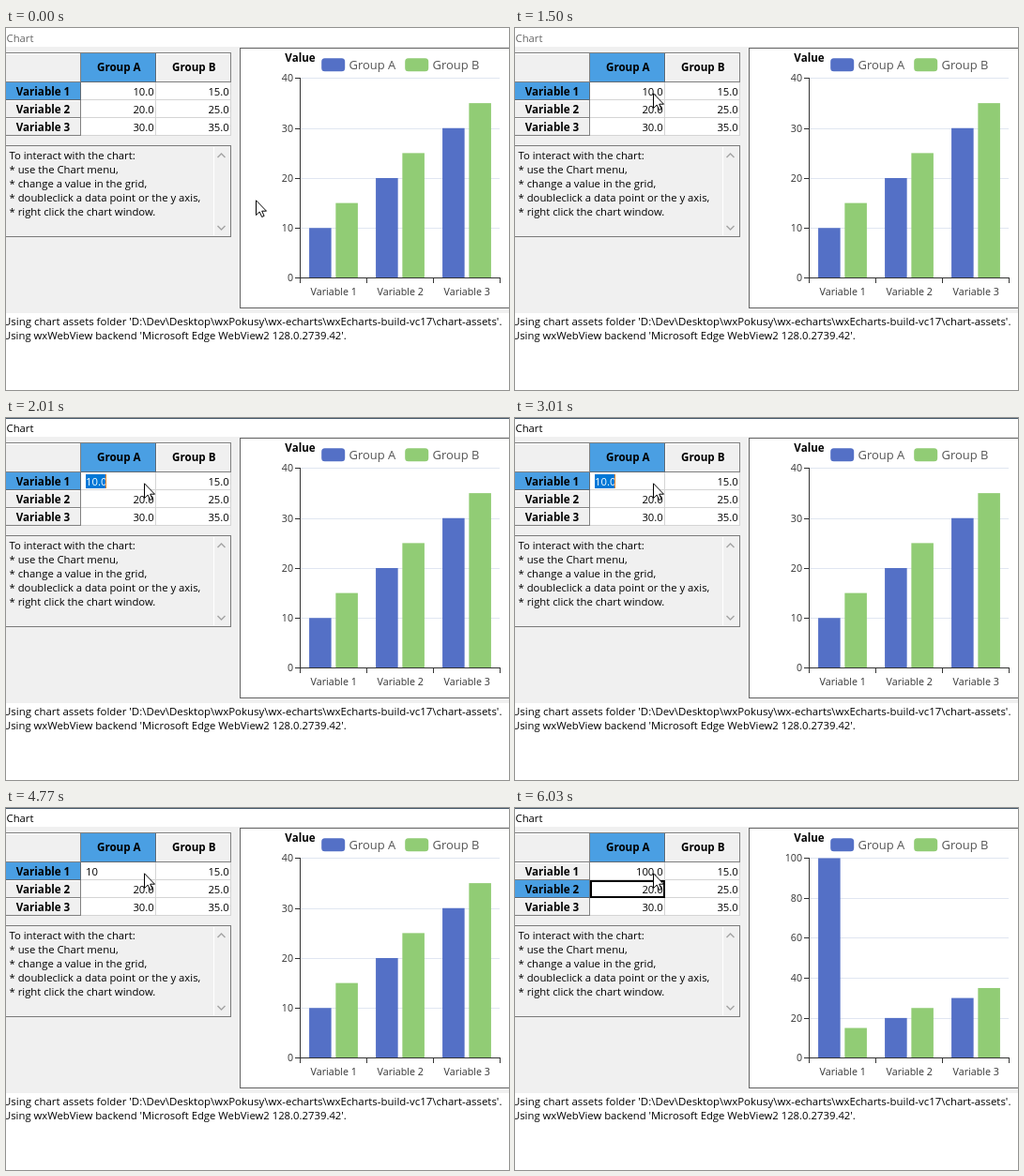
Animation of 536x386 px, one loop 8 s. Source, as an HTML page:

```html
<!DOCTYPE html>
<html lang="en">
<head>
<meta charset="utf-8">
<title>Chart</title>
<style>
html, body { margin: 0; width: 100%; height: 100%; overflow: hidden; background: #f0f0f0; }
svg { display: block; width: 536px; height: 386px; font: 11.3px "Open Sans", "Noto Sans", sans-serif; }
rect, line { shape-rendering: crispEdges; }
.smooth { shape-rendering: auto; }
text { white-space: pre; }
.bold { font-weight: 700; font-size: 11.6px; }
.mid { text-anchor: middle; }
.end { text-anchor: end; }
.axis { font-size: 10.7px; fill: #333; }
.legend { font-size: 12.95px; fill: #555; }

.step { animation: 8s step-end infinite; }
.cursor { animation-name: cursor; }
.title { animation-name: title; }
.focus { animation-name: focus; }
.caret { animation-name: caret; }
.active { animation-name: active; }
.idle { animation-name: idle; }
.editing { animation-name: editing; }
.selected { animation-name: selected; }
.full { animation-name: full; }
.dot { animation-name: dot; }
.ten { animation-name: ten; }
.hundred { animation-name: hundred; }
.before { animation-name: before; }
.after { animation-name: after; }

@keyframes cursor {
  0% { transform: translate(266px, 183px); opacity: 1; }
  9.375% { transform: translate(266px, 182px); opacity: 1; }
  12.5% { transform: translate(223px, 145px); opacity: 1; }
  15.625% { transform: translate(164px, 92px); opacity: 1; }
  18.75% { transform: translate(147px, 69px); opacity: 1; }
  62.75% { transform: translate(147px, 69px); opacity: 0; }
  75.375%, 100% { transform: translate(147px, 69px); opacity: 1; }
}
@keyframes title { 0% { fill: #666; } 21.875%, 100% { fill: #000; } }
@keyframes active { 0% { opacity: 0; } 21.875%, 100% { opacity: 1; } }
@keyframes focus {
  0% { opacity: 0; transform: none; }
  21.875% { opacity: 1; transform: none; }
  25.125% { opacity: 0; transform: none; }
  75.375%, 100% { opacity: 1; transform: translateY(19px); }
}
@keyframes caret {
  0% { opacity: 0; transform: translateX(106px); fill: #ff8728; }
  25.125% { opacity: 1; transform: translateX(106px); fill: #ff8728; }
  31.375% { opacity: 0; transform: translateX(106px); fill: #ff8728; }
  37.625% { opacity: 1; transform: translateX(106px); fill: #ff8728; }
  44% { opacity: 1; transform: translateX(106px); fill: #000; }
  50.25% { opacity: 1; transform: translateX(100px); fill: #000; }
  53.375% { opacity: 1; transform: translateX(97px); fill: #000; }
  59.625% { opacity: 0; transform: translateX(97px); fill: #000; }
  62.75% { opacity: 1; transform: translateX(103px); fill: #000; }
  69%, 100% { opacity: 0; transform: translateX(103px); fill: #000; }
}
@keyframes idle { 0% { opacity: 1; } 25.125%, 100% { opacity: 0; } }
@keyframes editing { 0% { opacity: 0; } 25.125% { opacity: 1; } 75.375%, 100% { opacity: 0; } }
@keyframes selected { 0% { opacity: 0; } 25.125% { opacity: 1; } 44%, 100% { opacity: 0; } }
@keyframes full { 0% { opacity: 0; } 44% { opacity: 1; } 50.25%, 100% { opacity: 0; } }
@keyframes dot { 0% { opacity: 0; } 50.25% { opacity: 1; } 53.375%, 100% { opacity: 0; } }
@keyframes ten { 0% { opacity: 0; } 53.375% { opacity: 1; } 62.75%, 100% { opacity: 0; } }
@keyframes hundred { 0% { opacity: 0; } 62.75% { opacity: 1; } 75.375%, 100% { opacity: 0; } }
@keyframes before { 0% { opacity: 1; } 75.375%, 100% { opacity: 0; } }
@keyframes after { 0% { opacity: 0; } 75.375%, 100% { opacity: 1; } }
</style>
</head>
<body>
<svg id="stage" viewBox="0 0 536 386"></svg>
<script>
const BLUE = '#5470c6', GREEN = '#91cc75', HIGHLIGHT = '#4a9fe3';

const rect = (x, y, w, h, fill, more = '') =>
  `<rect x="${x}" y="${y}" width="${w}" height="${h}" fill="${fill}" ${more}/>`;
const text = (x, y, str, cls = '', more = '') =>
  `<text x="${x}" y="${y}" class="${cls}" ${more}>${str}</text>`;
const during = (name, body) => `<g class="step ${name}">${body}</g>`;

// Header cells have a dark right and bottom edge; plain ones also a light top and left edge.
const header = (x, y, w, h) =>
  rect(x, y, w, h, '#808080') + rect(x, y, w - 1, h - 1, '#fff') +
  rect(x + 1, y + 1, w - 2, h - 2, '#f0f0f0');
const litHeader = (x, y, w, h) =>
  rect(x, y, w, h, '#606a74') + rect(x, y, w - 1, h - 1, HIGHLIGHT);

function titleBar() {
  return rect(0, 0, 536, 20, '#fff') +
    during('active', rect(0, 0, 536, 1, '#46596b')) +
    text(.5, 15, 'Chart', 'step title');
}

function grid() {
  const rowTop = i => 58 + 19 * i;
  let out = rect(0, 26, 240, 1, '#808080') + header(-1, 27, 81, 31) +
    litHeader(80, 27, 80, 31) + header(160, 27, 80, 31) +
    text(120.3, 46, 'Group A', 'bold mid') + text(200.3, 46, 'Group B', 'bold mid');
  const values = [[null, '15.0'], ['20.0', '25.0'], ['30.0', '35.0']];
  values.forEach((row, i) => {
    const y = rowTop(i);
    out += header(-1, y, 81, 19) + rect(80, y, 160, 19, '#fff') + rect(80, y + 18, 160, 1, '#d4d4d4') +
      rect(159, y, 1, 19, '#d4d4d4') + rect(239, y, 1, 19, '#d4d4d4');
    if (i < 2) out += during(i ? 'after' : 'before', litHeader(-1, y, 81, 19));
    out += text(39.5, y + 14, 'Variable ' + (i + 1), 'bold mid');
    row.forEach((v, j) => { if (v) out += text(157.8 + 80 * j, y + 14, v, 'end'); });
  });
  return out + text(157.8, 72, '10.0', 'end step idle') + text(157.8, 72, '100.0', 'end step after') +
    during('focus', '<rect x="81" y="59" width="78" height="17" fill="none" stroke="#000" stroke-width="2"/>');
}

function editor() {
  const typed = (cls, str) => text(85, 72, str, 'step ' + cls);
  return during('editing', rect(80, 58, 79, 18, '#fff')) +
    during('selected', rect(85, 60, 21, 15, '#0078d7') + text(85, 72, '10.0', '', 'fill="#fff"')) +
    typed('full', '10.0') + typed('dot', '10.') + typed('ten', '10') + typed('hundred', '100') +
    rect(0, 60, 1, 15, '#000', 'class="step caret"');
}

function help() {
  const lines = ['To interact with the chart:', '* use the Chart menu,', '* change a value in the grid,',
    '* doubleclick a data point or the y axis,', '* right click the chart window.'];
  const arrow = d => `<path d="${d}" fill="none" stroke="#a4a4a4" stroke-width="1.4"/>`;
  return rect(-1, 125, 241, 98, '#7a7a7a') + rect(-1, 126, 240, 96, '#f0f0f0') +
    rect(221, 127, 1, 94, '#fff') +
    lines.map((s, i) => text(3.5, 140 + 15 * i, s)).join('') +
    arrow('M225.5 138l4-4 4 4') + arrow('M225.5 211l4 4 4-4');
}

function plot(max, step, groupA) {
  const scale = 213 / max, base = 266.5;
  const band = 71, width = band * .73 / 2.2, left = 313.5 + band * .135;
  let out = '';
  for (let v = 0; v <= max; v += step) {
    const y = Math.round(base - v * scale - .25);
    if (v) out += rect(314, y, 212, 1, '#e0e6f1');
    out += rect(308, y, 5, 1, '#333') + text(306, y + 4.3, v, 'axis end');
  }
  const bar = (x, v, fill) => rect(x, base - v * scale, width, v * scale, fill, 'class="smooth"');
  groupA.forEach((a, i) => {
    const x = left + band * i;
    out += bar(x, a, BLUE) + bar(x + width * 1.2, [15, 25, 35][i], GREEN);
  });
  return out;
}

function chart() {
  let out = rect(249, 21, 287, 278, '#646464') + rect(250, 22, 286, 276, '#fff') +
    text(313.5, 35.6, 'Value', 'bold mid');
  [['Group A', BLUE], ['Group B', GREEN]].forEach(([name, fill], i) => {
    const x = 336.2 + 89 * i;
    out += rect(x, 32.3, 25, 14, fill, 'rx="3.5" class="smooth"') + text(x + 29.3, 43.7, name, 'legend');
  });
  out += during('before', plot(40, 10, [10, 20, 30])) + during('after', plot(100, 20, [100, 20, 30]));
  out += rect(313, 53, 1, 214, '#333') + rect(313, 266, 214, 1, '#333');
  for (let i = 0; i < 4; i++) {
    out += rect(313 + 71 * i, 267, 1, 5, '#333');
    if (i < 3) out += text(349.2 + 71 * i, 284.6, 'Variable ' + (i + 1), 'axis mid');
  }
  return out;
}

function log() {
  return rect(0, 304, 536, 82, '#fff') +
    text(-3, 317, "Using chart assets folder 'D:\\Dev\\Desktop\\wxPokusy\\wx-echarts\\wxEcharts-build-vc17\\chart-assets'.",
      '', 'font-size="11.44"') +
    text(-3, 332, "Using wxWebView backend 'Microsoft Edge WebView2 128.0.2739.42'.");
}

function cursor() {
  return during('cursor',
    '<path d="M.5 .8V16.6L4.2 13.1 6.7 18.5 9.1 17.4 6.7 12.2H11.5Z" fill="#fff" stroke="#000" stroke-width="1"/>');
}

document.getElementById('stage').innerHTML =
  rect(0, 0, 536, 386, '#f0f0f0') + titleBar() + grid() + editor() + help() + chart() + log() + cursor();
</script>
</body>
</html>
```
